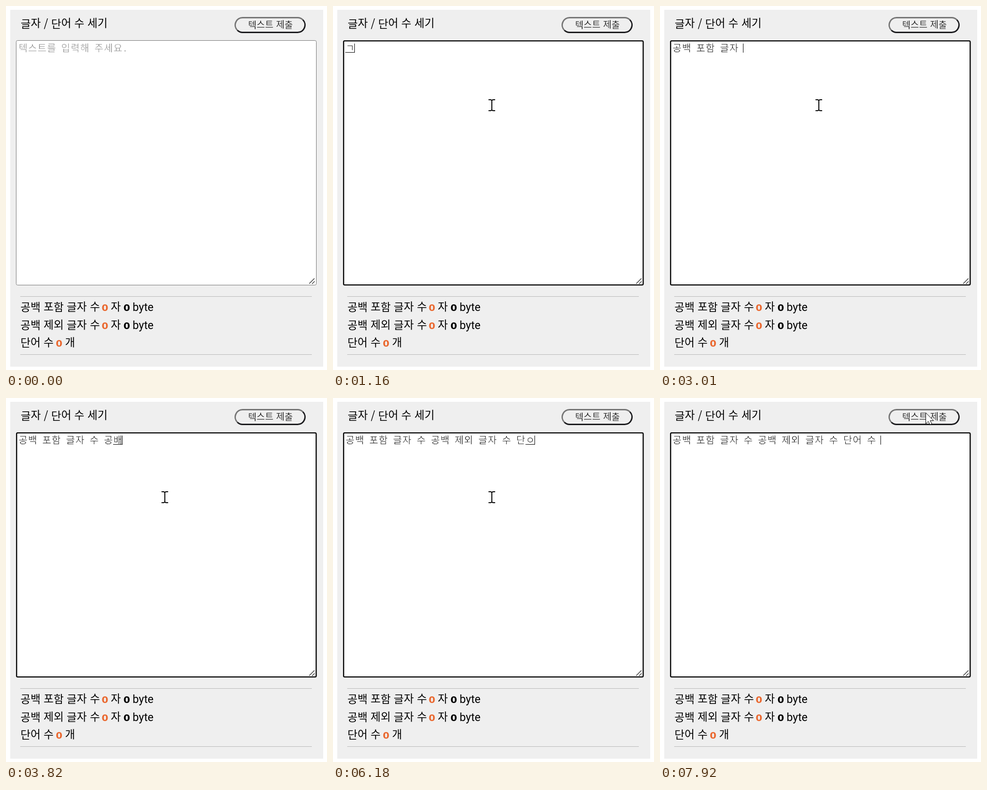
An HTML page that plays this animation: 677 by 765 pixels, repeating every 8 s.

```html
<!DOCTYPE html>
<html lang="ko">
<head>
<meta charset="utf-8">
<title>글자 / 단어 수 세기</title>
<style>
  html, body { margin: 0; width: 100%; height: 100%; overflow: hidden; background: #fff; }
  svg { display: block; width: 100%; height: 100%; }
  text { font-family: 'Noto Sans CJK KR', 'Noto Sans CJK JP', sans-serif; font-size: 23px; fill: #000; white-space: pre; }
  .latin { font-family: Roboto, sans-serif; font-size: 23.3px; }
  .num { font-family: 'DejaVu Sans', sans-serif; font-size: 20px; font-weight: 700; text-anchor: middle; }
  .hot { fill: #ea6a32; }
  /* A background-coloured outline thins the strokes. */
  .button { font-size: 19.4px; stroke: #efefef; stroke-width: .35; }
  .cell { font-size: 20.5px; text-anchor: middle; stroke: #fff; stroke-width: .6; }
  .hint { fill: #808080; }
</style>
</head>
<body>
<svg viewBox="0 0 677 765">
  <rect x="9" y="8" width="660" height="750" fill="#efefef"/>

  <g fill="none" stroke-width="3">
    <path d="M488 51A15.5 15.5 0 0 1 499 24.5H615A15.5 15.5 0 0 1 626 29" stroke="#767676"/>
    <path d="M626 29A15.5 15.5 0 0 1 615 55.5H499A15.5 15.5 0 0 1 488 51" stroke="#1c1c1f"/>
  </g>

  <rect x="21.5" y="72.5" width="633" height="514" rx="3" fill="#fff" stroke="#767676"/>
  <g id="focus" fill="none">
    <rect x="20.5" y="71.5" width="635" height="516" rx="4" stroke="#fff"/>
    <rect x="22.3" y="73.3" width="631.9" height="512.9" rx="2.5" stroke="#101010" stroke-width="2.6"/>
  </g>
  <path d="M639.5 583.5L650.5 572.5M645.5 584L651 578.5" stroke="#4c4c4c" stroke-width="1.7"/>

  <path d="M30 610.5H645M30 732.5H645" stroke="#b9b9b9"/>
  <g id="labels"></g>

  <text id="hint" class="cell hint" y="95.5"></text>
  <text id="typed" class="cell" y="95.5"></text>
  <rect id="underline" y="97" width="20" height="1"/>
  <rect id="caret" y="79" width="1" height="19"/>

  <circle id="press" cx="332" cy="207" r="18" fill="#ff0" fill-opacity=".45"/>
  <path id="beam" d="M-7-11.5H-2L0-10 2-11.5H7M-7 11.5H-2L0 10 2 11.5H7M0-10V10" fill="none" stroke="#000" stroke-width="2"/>
  <path id="arrow" d="M.5 1V24L5.8 19.2 9.6 26 13.4 24.2 9.8 17.6H17Z" fill="#fff" stroke="#000"/>
</svg>
<script>
const LOOP = 8000, LEFT = 26, BLINK = 510;
const FOCUS = 650, CARET_ON = 710, RELEASE = 900;
const $ = id => document.getElementById(id);
const show = (id, on) => $(id).setAttribute('visibility', on ? 'visible' : 'hidden');

// Keystroke bursts: start, end, states of the current word; _ commits it with a space.
const bursts = [
  [1160, 1260, 'ㄱ 고'],
  [1410, 1730, '공 공ㅂ 공배 공백 _'],
  [1930, 2490, 'ㅍ 포 퐇 포하 포함 _ ㄱ 그'],
  [2640, 2810, '글 글ㅈ 글자'],
  [2960, 3110, '_ ㅅ 수'],
  [3310, 3620, '_ ㄱ 고 공'],
  [3820, 4140, '공배 공백 _ ㅈ 제'],
  [4290, 4390, '젱 제오'],
  [4550, 4550, '제외'],
  [4700, 4900, '_ ㄱ 그'],
  [5050, 5220, '글 글ㅈ 글자'],
  [5370, 5370, '_'],
  [5520, 5570, 'ㅅ 수'],
  [5730, 5730, '_'],
  [5880, 5930, 'ㄷ 다'],
  [6080, 6540, '단 단ㅇ 단어 _ ㅅ 수'],
  [6690, 6690, '_']
];

const keys = [{ t: CARET_ON, text: '' }];
let done = '', word = '';
for (const [start, end, list] of bursts) {
  const states = list.split(' ');
  states.forEach((state, i) => {
    if (state === '_') { done += word + ' '; word = ''; }
    else word = state;
    const t = start + (end - start) * i / Math.max(1, states.length - 1);
    keys.push({ t, text: done + word });
  });
}

// Full-width syllables take 20 px, spaces and full stops 10 px.
const advance = c => c === ' ' || c === '.' ? 10 : 20;
const widthOf = s => [...s].reduce((w, c) => w + advance(c), 0);

function setCells(id, s) {
  let x = LEFT;
  const centres = [...s].map(c => {
    const a = advance(c);
    x += a;
    return x - a / 2;
  });
  $(id).setAttribute('x', centres.join(' ') || LEFT);
  $(id).textContent = s;
}

// Syllables without a final consonant sit a little higher in the display type.
const isOpen = c => c >= '가' && c <= '힣' && (c.charCodeAt(0) - 0xac00) % 28 === 0;
const label = (x, y, s, cls = '') => {
  const ys = [...s].map(c => isOpen(c) ? y - 1.5 : y).join(' ');
  return `<text x="${x}" y="${ys}" class="${cls}">${s}</text>`;
};
const counter = (y, s) => label(30.5, y, s) + label(208.7, y, '0', 'num hot') +
  label(221, y, '자') + label(254.7, y, '0', 'num') + label(267, y, 'byte', 'latin');
$('labels').innerHTML = label(31, 45.5, '글자 / 단어 수 세기') +
  label(510.5, 47, '텍스트 제출', 'button') +
  counter(641, '공백 포함 글자 수') + counter(679, '공백 제외 글자 수') +
  label(30.5, 716, '단어 수') + label(112, 716, '0', 'num hot') + label(124.5, 716, '개');
setCells('hint', '텍스트를 입력해 주세요.');

const moves = [
  { start: 140, step: 50, count: 5, from: [345, 775], to: [335, 208.5], ease: p => 1 - (1 - p) ** 2 },
  { start: 7400, step: 52, count: 11, from: [335, 208.5], to: [560, 30], ease: p => p * p * (3 - 2 * p) }
];

function pointerAt(t) {
  const m = moves.filter(m => t >= m.start).pop();
  if (!m) return null;
  const i = Math.min(m.count, Math.floor((t - m.start) / m.step) + 1);
  const p = m.ease(i / m.count);
  return m.from.map((a, k) => a + (m.to[k] - a) * p);
}

let current;
function draw(t) {
  const key = keys.filter(k => t >= k.t).pop();
  const text = key ? key.text : '';
  if (text !== current) {
    setCells('typed', text);
    const end = LEFT + widthOf(text);
    $('underline').setAttribute('x', end - 20);
    $('caret').setAttribute('x', end - 1);
    current = text;
  }
  show('hint', !text);
  show('underline', text && !text.endsWith(' '));
  show('caret', key && Math.floor((t - key.t) / BLINK) % 2 === 0);
  show('focus', t >= FOCUS);
  show('press', t >= FOCUS && t < RELEASE);

  const at = pointerAt(t);
  const inside = at && at[1] > 72 && at[1] < 587;
  show('beam', inside);
  show('arrow', at && !inside);
  if (at) $(inside ? 'beam' : 'arrow').setAttribute('transform', `translate(${at})`);
}

const began = performance.now();
function tick() {
  draw((performance.now() - began) % LOOP);
  requestAnimationFrame(tick);
}
tick();
</script>
</body>
</html>
```
